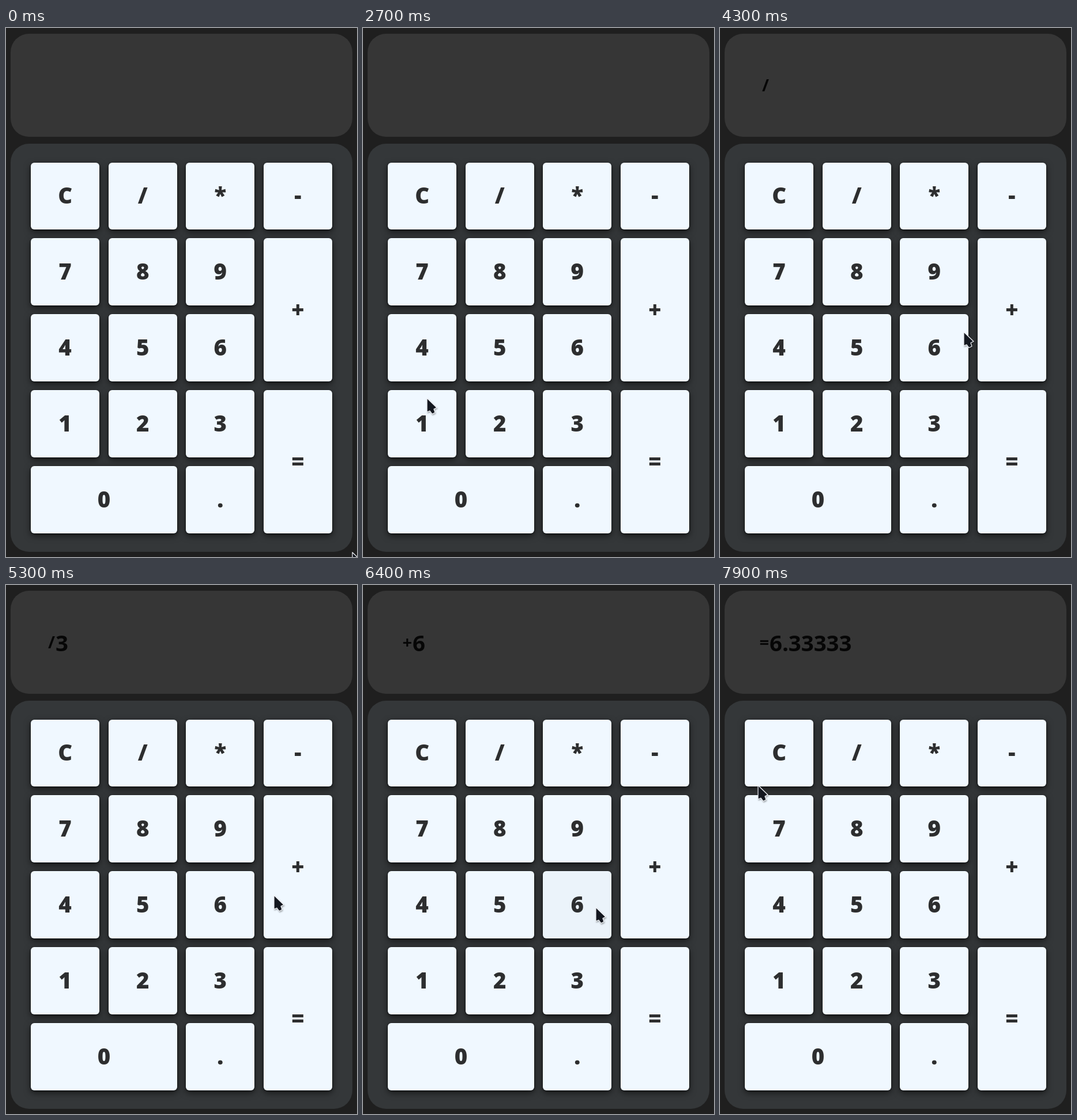
Write an HTML page that moves like this. It is 609 px wide and 919 px high and loops after 8000 ms.

```html
<!DOCTYPE html>
<html lang="en">
<head>
<meta charset="utf-8">
<title>Calculator</title>
<style>
  html, body { margin: 0; width: 100%; height: 100%; overflow: hidden; background: #1f1f1f; }
  #stage { position: relative; width: 609px; height: 919px; overflow: hidden; font: 700 38.4px "Open Sans", sans-serif; }
  #stage > * { position: absolute; }
  .panel { left: 8px; width: 593px; border-radius: 32px; }
  #screen { top: 10px; height: 179px; background: #363636; }
  #pad { top: 201px; height: 709px; background: #343739; }
  .key {
    box-sizing: border-box; padding-bottom: 3px;
    display: flex; align-items: center; justify-content: center;
    border-radius: 6px; background: #f0f8ff; color: #2d2e2f; font-weight: 800;
    box-shadow: 0 4px 12px rgba(0, 0, 0, .6), 0 1px 3px rgba(0, 0, 0, .6);
  }
  svg { left: 0; top: 0; }
  text { fill: #060606; }
  #cursor { filter: drop-shadow(1px 2px 1px rgba(0, 0, 0, .3)); }
</style>
</head>
<body>
<div id="stage">
  <div id="screen" class="panel"></div>
  <div id="pad" class="panel"></div>
  <svg id="overlay" width="609" height="919">
    <text id="op" x="85" y="110" font-size="29" text-anchor="end"></text>
    <text id="num" x="86" y="115"></text>
    <path id="cursor" d="M0 0V24L5 22L9 27.5L14 25L12 19L17 16.5Z"
      fill="#141820" stroke="#f4f6fa" stroke-width="1.2" stroke-linejoin="round"/>
  </svg>
</div>
<script>
const LOOP = 8000, STEP = 100, TRAVEL = 400;
const $ = id => document.getElementById(id);

// Repeated labels in the grid form one larger key.
const grid = ['C/*-', '789+', '456+', '123=', '00.='];
const pitch = { x: 134.6, y: 131.95 }, size = { x: 119.2, y: 116.4 };
const keys = {};

for (const label of new Set(grid.join(''))) {
  const row = grid.findIndex(line => line.includes(label));
  const col = grid[row].indexOf(label);
  const w = grid[row].lastIndexOf(label) - col;
  const h = grid.filter(line => line.includes(label)).length - 1;
  const el = document.createElement('div');
  el.className = 'key';
  el.textContent = label;
  Object.assign(el.style, {
    left: `${43 + col * pitch.x}px`,
    top: `${233.5 + row * pitch.y}px`,
    width: `${size.x + w * pitch.x}px`,
    height: `${size.y + h * pitch.y}px`
  });
  $('stage').insertBefore(el, $('overlay'));
  keys[label] = el;
}

const presses = [[3100, '1'], [4000, '/'], [4800, '3'], [5700, '+'], [6200, '6'], [7400, '=']];

// arrival time and pointer tip; it rests until TRAVEL before the next arrival
const stops = [
  [0, 601, 911], [200, 571, 864], [2200, 559, 300], [2700, 111, 643], [3000, 97, 692],
  [3900, 223, 292], [4300, 423, 528], [4700, 390, 690], [5100, 465, 539], [5700, 465, 539],
  [5900, 404, 560], [6900, 518, 744], [7200, 490, 734], [7800, 38, 360], [7900, 66, 348]
];

function pointer(t) {
  const i = stops.findIndex(s => s[0] > t);
  if (i < 0) return stops.at(-1).slice(1);
  const [t0, x0, y0] = stops[i - 1], [t1, x1, y1] = stops[i];
  const span = Math.min(TRAVEL, t1 - t0);
  const k = Math.max(0, 1 - (t1 - t) / span);
  return [x0 + (x1 - x0) * k, y0 + (y1 - y0) * k];
}

const apply = { '': (a, b) => b, '/': (a, b) => a / b, '+': (a, b) => a + b };

function display(t) {
  let total = 0, op = '', num = '';
  for (const [at, label] of presses) {
    if (at > t) break;
    if (/\d/.test(label)) {
      num += label;
    } else {
      total = apply[op](total, Number(num));
      op = label;
      num = label === '=' ? total.toPrecision(6) : '';
    }
  }
  return [op, num];
}

function render(t) {
  for (const [at, label] of presses) {
    const age = t - at;
    const dim = age >= 0 && age < 3 * STEP ? 20 * 0.5 ** (age / STEP) : 0;
    keys[label].style.background = `rgb(${240 - dim}, ${248 - dim}, ${255 - dim})`;
  }
  [$('op').textContent, $('num').textContent] = display(t);
  $('cursor').setAttribute('transform', `translate(${pointer(t)})`);
  $('cursor').setAttribute('visibility', t >= 1500 && t < 2200 ? 'hidden' : 'visible');
}

const start = performance.now();
function tick() {
  const t = (performance.now() - start) % LOOP;
  render(Math.floor(t / STEP) * STEP);
  requestAnimationFrame(tick);
}
tick();
</script>
</body>
</html>
```
